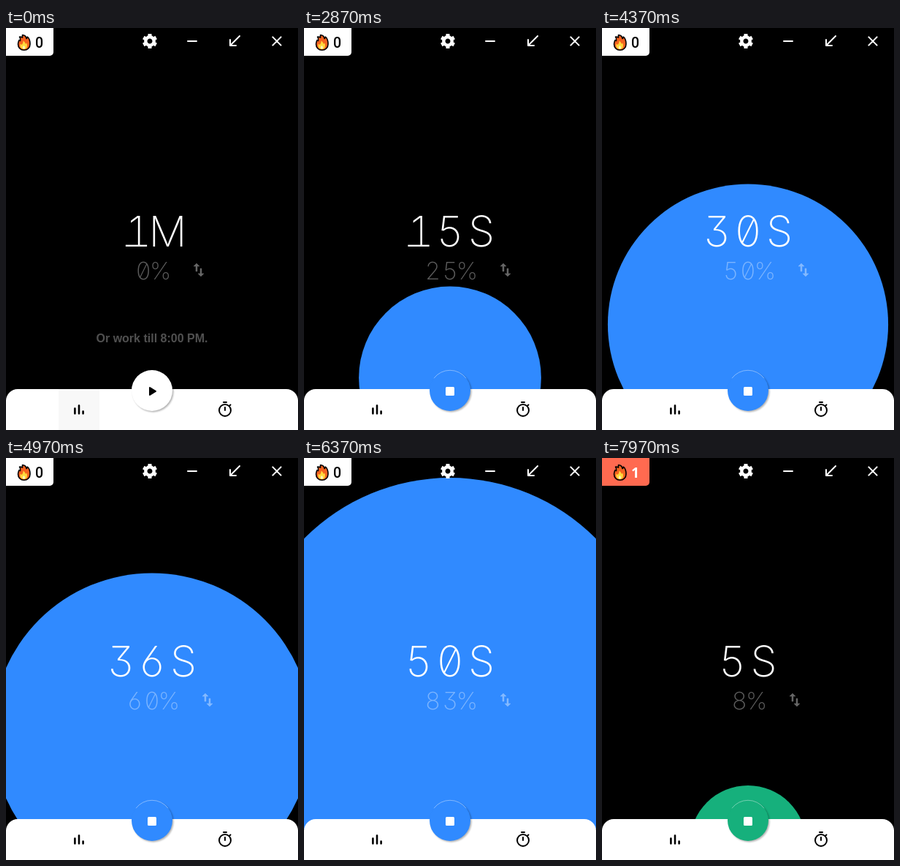
An HTML page that plays this animation: 400x550 px, repeating every 8000 ms.

```html
<!DOCTYPE html>
<html lang="en">
<head>
<meta charset="utf-8">
<title>Focus timer</title>
<style>
html, body { margin: 0; width: 100%; height: 100%; overflow: hidden; background: #000; }
svg { display: block; width: 400px; height: 550px; }
text { text-anchor: middle; }
.clock { font-family: Inter, sans-serif; font-weight: 200; font-optical-sizing: none; fill: #fff; stroke: none;
  font-feature-settings: "zero", "cv03", "cv04", "cv09"; }
.line { fill: none; stroke-width: 2; }
</style>
</head>
<body>
<svg viewBox="0 0 400 550">
  <defs>
    <filter id="soft" x="-20%" y="-20%" width="140%" height="140%"><feGaussianBlur stdDeviation=".8"/></filter>
  </defs>
  <rect width="400" height="550"/>
  <circle id="disc" cx="200"/>

  <path id="badge" d="M0 0H65V33a5 5 0 0 1-5 5H0z"/>
  <g stroke="#000" stroke-width="1.6" stroke-linejoin="round">
    <path fill="#f4621f" d="M22.500 9.500c3 .2 5 2 5.500 5 1-.5 1.300-1.500 1.300-2.500 2.500 2 3.700 6 3.700 10 0 5-3.500 8.300-8.300 8.300S16.500 27 16.500 22c0-2.500.8-4 1.500-5.500l1.500 1c.5-3-.2-4.500-1-5.500 1.500 0 3 .3 4 1z"/>
    <path fill="#ffd93b" stroke="none" d="M23.500 17.500c2.500 2 3 3 3.500 4.500l1.500-1.500c1 4.500.3 8.500-3.800 8.500-4.700 0-6-4-5-7.500l1.700 1.500c1.500-1 2.200-3 2.100-5.500z"/>
    <path fill="#fff3c0" stroke="none" d="M24.500 24c2 1.500 2 4.700 0 4.700s-2.500-2.700 0-4.700z"/>
  </g>
  <text id="streak" x="45.500" y="27" font-size="19.500"></text>

  <g class="line" stroke="#fff" stroke-linejoin="round">
    <g id="gear" transform="translate(197 18)"><circle r="5.700" stroke-width="4.400"/></g>
    <path stroke-linecap="round" d="M249 18h12M320 11 307.500 23.500M307 16v8h8M365.400 12.400l11.200 11.200m0-11.200-11.200 11.200"/>
  </g>

  <g id="time" class="clock" font-size="58"></g>
  <g id="percent" class="clock" font-size="33" opacity=".36"></g>
  <path id="swap" fill="#fff" stroke="#fff" stroke-width=".5" opacity=".4" d="M-3-9-7-5h3v7h2v-7h3zM4 5v-7H2v7h-3l4 4 4-4z"/>
  <text id="hint" x="200" y="430" font-family="Liberation Sans, Arial, sans-serif" font-size="16" font-weight="700" fill="#505050">Or work till 8:00 PM.</text>

  <path fill="#fff" d="M0 550V510a16 16 0 0 1 16-16H384a16 16 0 0 1 16 16V550z"/>
  <rect id="hover" x="72" y="494" width="56" height="56" fill="#f8f8f8"/>
  <g class="line" stroke="#000" stroke-linecap="round">
    <path stroke-width="2.600" d="M94.400 520.500v7M100 516.500v11M105.600 524.500v3"/>
    <circle cx="300" cy="523" r="8"/>
    <path d="M298 512h4M300 519v4M306.500 516.500l1-1"/>
  </g>

  <circle cx="201.500" cy="497.500" r="28" opacity=".3" filter="url(#soft)"/>
  <circle id="button" cx="200" cy="496" r="28"/>
  <path id="rim" fill="none" stroke="#fff" opacity=".4" d="M178 479.200a27.600 27.600 0 0 1 44 0"/>
  <path id="play" stroke="#000" stroke-width="2" stroke-linejoin="round" d="M197 492v10l8-5z"/>
  <rect id="stop" x="194" y="491" width="12" height="12" rx="1.500" fill="#fff"/>
</svg>
<script>
const LOOP = 8000, START = 1300, DONE = 7410, SECOND = 100;
const BLUE = '#308aff', GREEN = '#16b07c';
const $ = id => document.getElementById(id);
const set = (id, attrs) => {
  for (const k in attrs) $(id).setAttribute(k, attrs[k]);
};
const show = (id, on) => set(id, { visibility: on ? 'visible' : 'hidden' });
const clamp = (v, lo, hi) => Math.min(hi, Math.max(lo, v));

for (let a = 0; a < 360; a += 60)
  $('gear').innerHTML += `<path stroke-width="5" d="M0-6.500V-10" transform="rotate(${a})"/>`;

// One centred cell per character; the 1 gets a foot
function write(id, str, pitch, y) {
  const box = $(id);
  if (box.dataset.str === str) return;
  box.dataset.str = str;
  box.innerHTML = [...str].map((c, i) => {
    const x = 200 + (i - (str.length - 1) / 2) * pitch;
    const foot = `<rect x="${x - pitch * .34}" y="${y - pitch * .055}" width="${pitch * .68}" height="${pitch * .055}"/>`;
    return `<text x="${x}" y="${y}">${c}</text>` + (c === '1' ? foot : '');
  }).join('');
}

function draw(t) {
  const running = t >= START, rest = t >= DONE;
  const age = t - (rest ? DONE : START);
  const sec = clamp(Math.floor(age / SECOND), 0, 60);
  const pct = Math.round(sec / 60 * 100) + '%';
  const color = rest ? GREEN : BLUE;

  write('time', !running || sec === 60 ? '1M' : sec + 'S', 43, 299);
  write('percent', pct, 23.5, 343.5);
  set('swap', { transform: `translate(${240 + 12 * pct.length} 331)` });

  // The disc grows while its top edge climbs, a little slower near the end
  const top = 500.3 - .0934 * age + .0043 * Math.max(0, age - 4970);
  const r = Math.max(0, 54.5 + .0448 * age);
  set('disc', { cy: top + r, r, fill: color });
  show('disc', running);

  set('badge', { fill: rest ? '#ff6a50' : '#fff' });
  set('streak', {
    fill: rest ? '#fff' : '#000',
    'font-weight': rest ? 700 : 500,
    'font-family': rest ? 'Open Sans, sans-serif' : 'Roboto, sans-serif'
  });
  $('streak').textContent = rest ? 1 : 0;

  set('hover', { opacity: clamp((270 - t) / 240, 0, 1) });
  set('button', { fill: running ? color : '#fff' });
  show('hint', !running);
  show('play', !running);
  show('stop', running);
  show('rim', running);
}

function tick(now) {
  draw(now % LOOP);
  requestAnimationFrame(tick);
}
draw(0);
requestAnimationFrame(tick);
</script>
</body>
</html>
```
